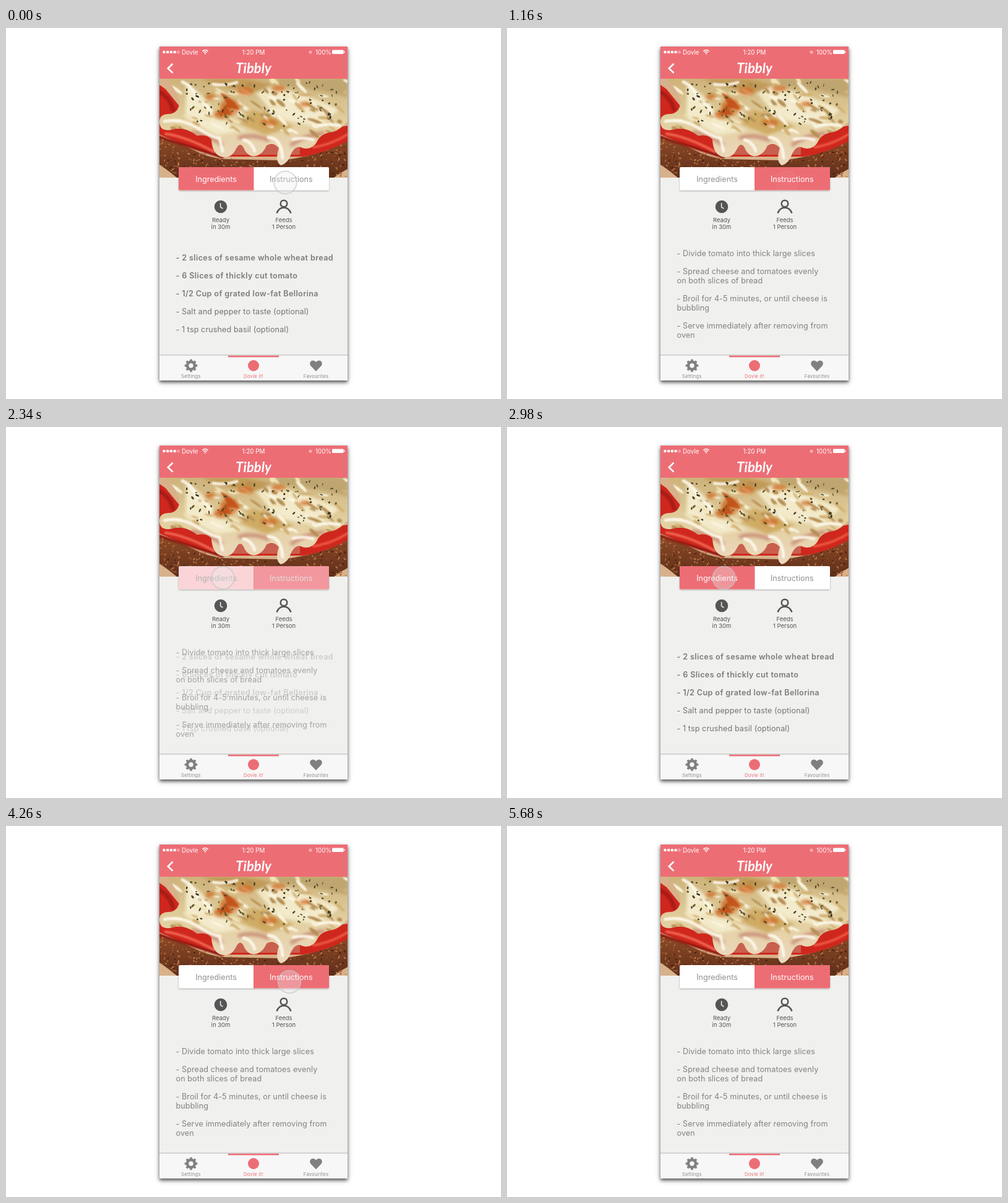
Animation, 800 px wide and 600 px high, one loop 5.7 s. Source, as an HTML page:

```html
<!DOCTYPE html>
<html lang="en">
<head>
<meta charset="utf-8">
<title>Recipe tabs</title>
<style>
  html, body { margin: 0; width: 100%; height: 100%; overflow: hidden; background: #fff; }
  .stage { position: relative; width: 800px; height: 600px; overflow: hidden; }
  .shadow {
    position: absolute; left: 248px; top: 30px; width: 304px; height: 540px;
    box-shadow: 0 3px 5px rgba(0,0,0,.55), 0 3px 9px rgba(0,0,0,.25);
  }
  svg { position: absolute; left: 0; top: 0; }
  text { font-family: Inter, Roboto, sans-serif; }
  .mid { text-anchor: middle; }
  .status { font-size: 9.8px; fill: #fff; }
  .title { font: italic 700 22px Lato, sans-serif; fill: #fff; }
  .label { font-size: 12.6px; }
  .fact { font-size: 9.5px; fill: #555; }
  .line { font-size: 12.6px; letter-spacing: .09px; fill: #828282; }
  .dark { fill: #747474; }
  .bold { font-weight: 600; letter-spacing: .37px; fill: #7b7b7b; }
  .tab { font-size: 7.7px; letter-spacing: .28px; fill: #8b8b8b; }
</style>
</head>
<body>
<div class="stage">
  <div class="shadow"></div>
  <svg width="800" height="600" viewBox="0 0 800 600">
    <defs>
      <clipPath id="photoClip"><rect x="248" y="82" width="304" height="160"/></clipPath>
      <path id="melt" d="M258 82Q275 98 281 120 278 139 263 139 247 139 248 153 249 167 265 165 287 157 309 174 325 171 332 180 333 203 347 208 364 212 371 197 379 180 386 198 394 211 407 206 417 201 421 190 432 184 441 194 434 216 444 222 455 220 461 203 469 188 479 194 494 198 502 185 508 170 528 168 540 165 552 151V82Z"/>
      <clipPath id="meltClip"><use href="#melt"/></clipPath>
      <linearGradient id="crust" x1="0" y1="0" x2="0" y2="1">
        <stop offset="0" stop-color="#8d4a27"/>
        <stop offset="1" stop-color="#5f2f1a"/>
      </linearGradient>
      <linearGradient id="cheese" x1="0" y1="0" x2="0" y2="1">
        <stop offset="0" stop-color="#cdb27a"/>
        <stop offset=".5" stop-color="#e2cf9f"/>
        <stop offset="1" stop-color="#edd9bf"/>
      </linearGradient>
      <filter id="soft" x="-30%" y="-30%" width="160%" height="160%">
        <feGaussianBlur stdDeviation="2.6"/>
      </filter>
      <filter id="blur" x="-30%" y="-30%" width="160%" height="160%">
        <feGaussianBlur stdDeviation="1.2"/>
      </filter>
      <filter id="lift" x="-5%" y="-10%" width="110%" height="130%">
        <feDropShadow dx="0" dy="1" stdDeviation=".8" flood-opacity=".35"/>
      </filter>
    </defs>

    <rect x="248" y="30" width="304" height="540" fill="#f0f0ee"/>

    <!-- photo -->
    <g clip-path="url(#photoClip)">
      <rect x="248" y="82" width="304" height="160" fill="#d8b18a"/>
      <path d="M248 177Q275 183 300 196T350 212L445 214Q515 206 552 178V228Q540 234 530 242H276Q262 230 248 221Z" fill="url(#crust)"/>
      <g id="crumbs"></g>
      <path d="M248 92L258 99 280 126 275 160 340 175 420 178 552 158V183Q515 203 480 208H350Q316 201 288 189T248 172Z" fill="#cf271d"/>
      <g fill="none" stroke-linecap="round" filter="url(#blur)">
        <path d="M248 176Q290 190 350 209" stroke="#8f1710" stroke-width="4"/>
        <path d="M258 171Q292 176 336 200" stroke="#ee6450" stroke-width="4"/>
        <path d="M497 193Q527 188 552 172" stroke="#ea5540" stroke-width="4"/>
        <path d="M250 105Q265 113 270 132" stroke="#a91c18" stroke-width="7"/>
      </g>
      <path d="M340 180Q370 170 405 183T475 183V205H345Z" fill="#c9604f"/>
      <use href="#melt" fill="url(#cheese)"/>
      <g clip-path="url(#meltClip)">
        <g filter="url(#soft)">
          <path d="M291 92Q325 108 340 145L388 166 340 173 290 145Z" fill="#f3eacb"/>
          <path d="M392 91Q460 95 539 132L505 160 440 147Z" fill="#f3eacb"/>
          <path d="M315 82H390L432 92 408 104 348 95Z" fill="#c19a58"/>
          <path d="M398 132Q430 140 465 160L420 173 378 155Z" fill="#cfab65"/>
          <path d="M440 82H552V112Q500 98 440 92Z" fill="#bfa56f"/>
          <path d="M300 168Q335 176 350 190M375 178Q400 170 425 182M460 190Q480 174 515 170" fill="none" stroke="#c98f78" stroke-width="6"/>
        </g>
        <g id="mottle" filter="url(#blur)"></g>
        <g fill="none" stroke="#fffaf0" stroke-linecap="round" stroke-width="5" opacity=".85" filter="url(#blur)">
          <path d="M256 151Q285 146 310 162T345 178L350 199"/>
          <path d="M384 181Q397 184 402 199M424 177Q445 178 447 210M464 180Q484 176 496 181M505 158Q523 154 539 158"/>
          <path d="M285 87Q302 95 309 113M335 91Q355 94 373 88"/>
        </g>
      </g>
      <g id="toast" filter="url(#soft)"></g>
      <path d="M346 104Q358 108 370 121L377 132 358 129 365 141 341 139 357 123Z" fill="#c04d14" opacity=".85" filter="url(#blur)"/>
      <g id="herbs"></g>
    </g>

    <!-- header -->
    <rect x="248" y="30" width="304" height="52" fill="#ed6d75"/>
    <g id="signal" fill="#fff"></g>
    <text class="status" x="284" y="43">Dovle</text>
    <path d="M317.4 37.6Q322 33.6 326.6 37.6M319.2 39.8Q322 37.4 324.8 39.8" fill="none" stroke="#fff" stroke-width="1.4"/>
    <circle cx="322" cy="41.6" r="1.1" fill="#fff"/>
    <text class="status mid" x="400" y="43">1:20 PM</text>
    <circle cx="492" cy="39" r="2.6" fill="#f5aeb2"/>
    <text class="status" x="500" y="43">100%</text>
    <rect x="527" y="35.5" width="18.5" height="6.5" rx="1" fill="#fff"/>
    <rect x="546" y="37.3" width="1.4" height="3" rx=".6" fill="#fff"/>
    <path d="M269.5 57.8L261.8 65.2 269.5 72.6" fill="none" stroke="#fff" stroke-width="2.6"/>
    <text class="title mid" x="400" y="73">Tibbly</text>

    <!-- segmented control -->
    <rect x="279" y="225" width="243" height="37.5" rx="2" fill="#fff" filter="url(#lift)"/>
    <path id="leftFill" d="M400.5 225V262.5H281Q279 262.5 279 260.5V227Q279 225 281 225Z" fill="#ed6d75"/>
    <path id="rightFill" d="M400 225V262.5H520Q522 262.5 522 260.5V227Q522 225 520 225Z" fill="#ed6d75"/>
    <text id="leftLabel" class="label mid" x="339.5" y="248.6">Ingredients</text>
    <text id="rightLabel" class="label mid" x="460.8" y="248.6">Instructions</text>

    <!-- facts -->
    <circle cx="347" cy="289" r="10.3" fill="#555"/>
    <path d="M346.6 283V289.6L350.4 292" fill="none" stroke="#f0f0ee" stroke-width="1.5"/>
    <g fill="none" stroke="#555" stroke-width="2.5">
      <circle cx="449" cy="284" r="5.3"/>
      <path d="M437.5 299.5Q441 290.5 449 290.5T460.5 299.5"/>
    </g>
    <text class="fact mid" x="347" y="313.6">Ready</text>
    <text class="fact mid" x="347" y="325.4">in 30m</text>
    <text class="fact mid" x="449" y="313.6">Feeds</text>
    <text class="fact mid" x="449" y="325.4">1 Person</text>

    <g id="ingredients"></g>
    <g id="instructions"></g>

    <!-- tab bar -->
    <rect x="248" y="528" width="304" height="42" fill="#f7f7f7"/>
    <rect x="248" y="528" width="304" height="1.8" fill="#cfcfcf"/>
    <rect x="359" y="529.8" width="82" height="2.6" fill="#ed6d75"/>
    <g fill="none" stroke="#808080">
      <circle cx="299" cy="546" r="6" stroke-width="4.6"/>
      <circle cx="299" cy="546" r="8.6" stroke-width="3.4" pathLength="16" stroke-dasharray="1 1" stroke-dashoffset=".5"/>
    </g>
    <circle cx="400" cy="546" r="9" fill="#ed6d75"/>
    <path d="M501 555.2L492.6 546.5Q489.5 542 493 538.8 497.5 536 501 540.2 504.5 536 509 538.8 512.5 542 509.4 546.5Z" fill="#808080"/>
    <text class="tab mid" x="299" y="566.3">Settings</text>
    <text class="tab mid" x="400" y="566.3" style="fill:#ed6d75">Dovle it!</text>
    <text class="tab mid" x="501" y="566.3">Favourites</text>

    <circle id="touch" r="18.3" fill="rgba(236,236,236,.32)" stroke="rgba(198,198,198,.68)" stroke-width="1.8"/>
  </svg>
</div>
<script>
const LOOP = 5700, FADE = 200;
const $ = id => document.getElementById(id);

function add(parent, tag, attrs, text) {
  const el = document.createElementNS('http://www.w3.org/2000/svg', tag);
  for (const k in attrs) el.setAttribute(k, attrs[k]);
  if (text) el.textContent = text;
  return $(parent).appendChild(el);
}

let seed = 17;
const rnd = () => (seed = seed * 16807 % 2147483647) / 2147483647;
const span = (a, b) => a + (b - a) * rnd();

function speck(parent, x, y, rx, ry, fill, angle = span(0, 180)) {
  add(parent, 'ellipse', { rx, ry, fill, transform: `translate(${x} ${y}) rotate(${angle})` });
}

// bread grain, following the curve of the crust
for (let i = 0; i < 260; i++) {
  const x = span(248, 552);
  const top = 214 - 36 * ((x - 410) / 160) ** 2;
  const low = Math.min(242, 221 + (x - 248) * .7);
  speck('crumbs', x, span(top, low), span(.8, 2.6), span(.5, 1.3),
    ['#b57544', '#48210f', '#a35a31', '#c48a55'][i % 4]);
}

// strands and shadows in the melted cheese
for (let i = 0; i < 90; i++)
  speck('mottle', span(270, 552), span(84, 172), span(4, 13), span(1.2, 3.2),
    ['#fbf5e0', '#b58f52', '#f1e3b8', '#d3b376'][i % 4], span(0, 55));

const toasted = [[362, 128, 16, 13], [387, 102, 13, 7], [347, 140, 12, 7],
  [440, 98, 12, 5], [425, 153, 14, 6], [330, 111, 8, 5], [483, 123, 9, 4]];
for (const [cx, cy, rx, ry] of toasted)
  add('toast', 'ellipse', { cx, cy, rx, ry, fill: '#cf6a20', opacity: .75 });

for (let i = 0; i < 90; i++) {
  const x = span(292, 535);
  speck('herbs', x, span(88, 164 - Math.abs(x - 410) * .1), span(1, 3.4), span(.7, 1.7),
    ['#4d4928', '#69602f', '#393620'][i % 3]);
}

for (let i = 0; i < 5; i++)
  add('signal', 'circle', {
    cx: 255.5 + i * 5.7, cy: 39, r: i < 4 ? 2.3 : 1.8,
    ...(i === 4 && { fill: 'none', stroke: '#fff', 'stroke-width': .7 })
  });

[
  ['- 2 slices of sesame whole wheat bread', 'bold'],
  ['- 6 Slices of thickly cut tomato', 'bold'],
  ['- 1/2 Cup of grated low-fat Bellorina', 'bold'],
  ['- Salt and pepper to taste (optional)', 'dark'],
  ['- 1 tsp crushed basil (optional)', 'dark']
].forEach(([text, kind], i) =>
  add('ingredients', 'text', { class: 'line ' + kind, x: 274.5, y: 375.5 + i * 29.2 }, text));

const steps = [
  '- Divide tomato into thick large slices', '',
  '- Spread cheese and tomatoes evenly', 'on both slices of bread', '',
  '- Broil for 4-5 minutes, or until cheese is', 'bubbling', '',
  '- Serve immediately after removing from', 'oven'
];
steps.forEach((text, i) =>
  text && add('instructions', 'text', { class: 'line', x: 274.5, y: 369.3 + i * 14.58 }, text));

// start, end, x, y of each press
const presses = [
  [-400, 1000, 451.5, 250],
  [1480, 3180, 350.5, 244],
  [3400, 4720, 458, 252]
];
const switches = [240, 2270, 3860];

function ramp(t, start) {
  const p = Math.min(1, Math.max(0, (t - start) / FADE));
  return p * p * (3 - 2 * p);
}

function labelColor(active) {
  const v = Math.round(145 + 110 * active);
  return `rgb(${v},${v},${v})`;
}

function draw(now) {
  const t = now % LOOP;
  const right = ramp(t, switches[0]) - ramp(t, switches[1]) + ramp(t, switches[2]);
  const left = 1 - right;
  $('leftFill').style.opacity = $('ingredients').style.opacity = left;
  $('rightFill').style.opacity = $('instructions').style.opacity = right;
  $('leftLabel').style.fill = labelColor(left);
  $('rightLabel').style.fill = labelColor(right);

  const press = presses.find(([a, b]) => t >= a && t <= b + FADE);
  const touch = $('touch');
  touch.style.opacity = press ? ramp(t, press[0]) * (1 - ramp(t, press[1])) : 0;
  if (press) touch.setAttribute('transform', `translate(${press[2]} ${press[3]})`);
}

const origin = performance.now();
function tick() {
  draw(performance.now() - origin);
  requestAnimationFrame(tick);
}
tick();
</script>
</body>
</html>
```
